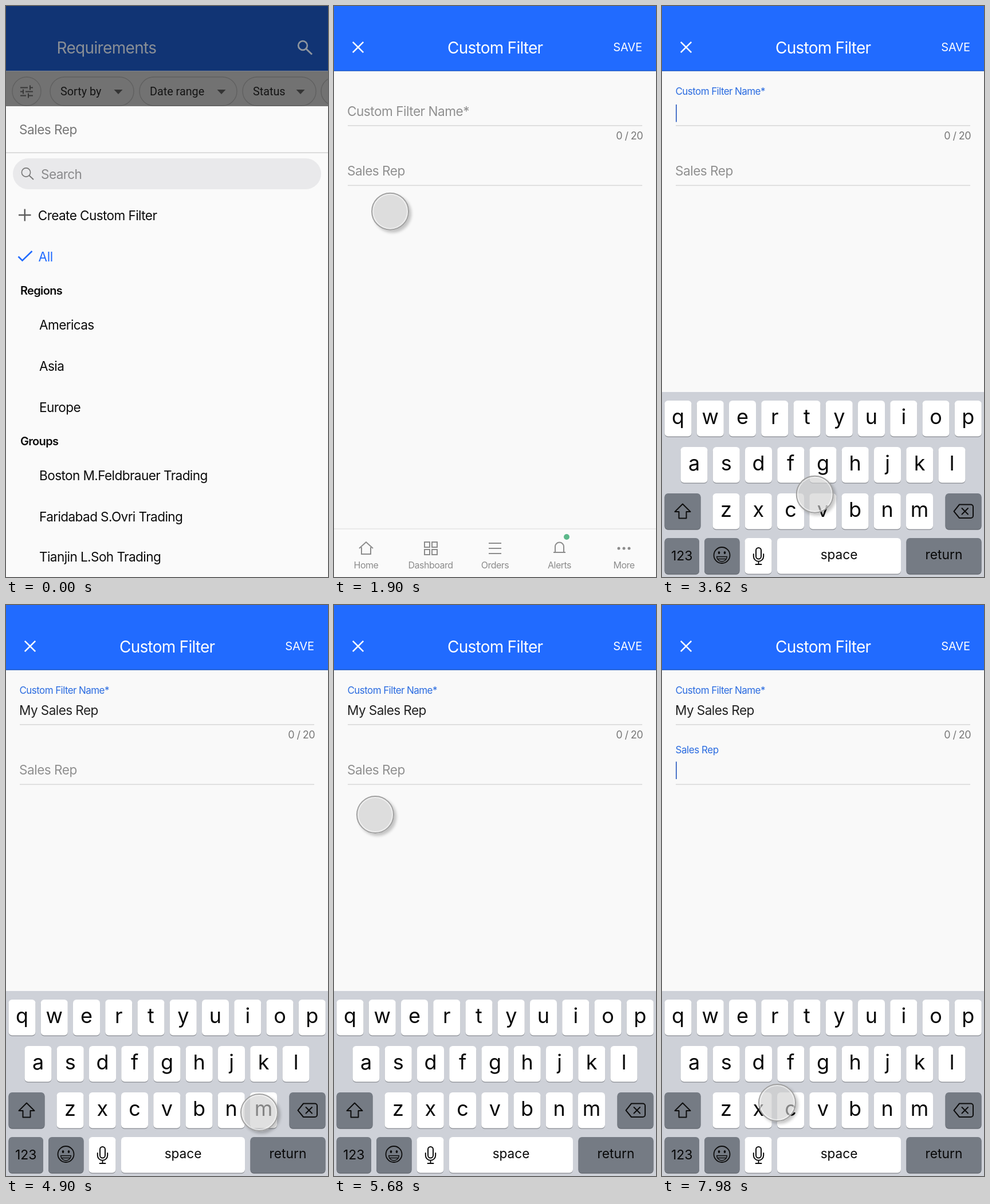
An HTML page that plays this animation: 562 px wide and 997 px high, repeating every 8000 ms.

```html
<!DOCTYPE html>
<html lang="en">
<head>
<meta charset="utf-8">
<title>Custom filter</title>
<style>
  html, body { margin: 0; width: 100%; height: 100%; overflow: hidden; background: #fafafa; }
  #stage { position: absolute; left: 0; top: 0; width: 562px; height: 997px; overflow: hidden; }
  svg { position: absolute; left: 0; top: 0; }
  text { font-family: Inter, "Open Sans", sans-serif; white-space: pre; }
  .chip { font-family: Roboto, sans-serif; }
  #touch {
    position: absolute; left: -33px; top: -33px; width: 66px; height: 66px;
    box-sizing: border-box; border-radius: 50%;
    border: 2px solid #a0a0a0; background: rgba(206, 206, 206, .63) padding-box;
    box-shadow: inset 0 0 0 2px rgba(255, 255, 255, .5), 4px 4px 5px rgba(0, 0, 0, .22);
  }
</style>
</head>
<body>
<div id="stage">
  <svg id="art" width="562" height="997" viewBox="0 0 562 997"></svg>
  <div id="touch"></div>
</div>
<script>
const NS = 'http://www.w3.org/2000/svg';
const art = document.getElementById('art');
const touch = document.getElementById('touch');
const BLUE = '#216bff', LINK = '#2a6be0', INK = '#0b0b0b';

function add(parent, tag, attrs, content) {
  const el = document.createElementNS(NS, tag);
  for (const name in attrs) el.setAttribute(name, attrs[name]);
  if (content) el.textContent = content;
  parent.appendChild(el);
  return el;
}
const group = parent => add(parent, 'g', {});
const rect = (p, x, y, w, h, fill, rx = 0) =>
  add(p, 'rect', { x, y, width: w, height: h, fill, rx });
const line = (p, d, stroke, width, more) =>
  add(p, 'path', { d, stroke, 'stroke-width': width, fill: 'none', ...more });
const ring = (p, cx, cy, r, stroke, width) =>
  add(p, 'circle', { cx, cy, r, stroke, 'stroke-width': width, fill: 'none' });
const text = (p, x, y, str, size = 22.6, fill = INK, gap = -.6, more) =>
  add(p, 'text', { x, y, fill, 'font-size': size, 'letter-spacing': gap, ...more }, str);

// Filter sheet over the dimmed list
function buildSheet(p) {
  rect(p, 0, 0, 562, 113.5, '#113474');
  text(p, 88.5, 82.5, 'Requirements', 28, '#8a8f96', -.67);
  ring(p, 518, 69, 7.8, '#8f969f', 2.7);
  line(p, 'M523.5 74.5L534 84.5', '#8f969f', 3);
  rect(p, 0, 113.5, 562, 61.5, '#727272');
  ring(p, 36, 149, 25, '#606060', 1.4);
  line(p, 'M25 142.5H38M42 142.5H47M25 149.5H30M34 149.5H47M25 156.5H35M39 156.5H47' +
    'M42 138.5V146.5M30 145.5V153.5M39 152.5V160.5', '#383838', 2);
  [[77, 146, 95, 'Sorty by', 196], [233, 170, 251, 'Date range', 376],
   [413, 128, 431, 'Status', 514], [550, 140]].forEach(([x, w, tx, label, ax]) => {
    add(p, 'rect', { x, y: 124, width: w, height: 50, rx: 25, fill: 'none', stroke: '#606060', 'stroke-width': 1.4 });
    if (!label) return;
    text(p, tx, 156, label, 19.8, '#141414', 0, { class: 'chip' });
    add(p, 'path', { d: `M${ax - 7.5} 146h15l-7.5 8z`, fill: '#343434' });
  });

  rect(p, 0, 175, 562, 822, '#fafafa');
  text(p, 23, 224, 'Sales Rep', 22.6, '#777', -.5);
  rect(p, 0, 255.5, 562, 1.4, '#d0d0d0');
  rect(p, 12, 266, 538, 54, '#e9e9eb', 27);
  ring(p, 35, 290.5, 7.6, '#777', 1.6);
  line(p, 'M40.5 296L48 303', '#777', 1.8);
  text(p, 61, 302, 'Search', 22.6, '#8a8a8c');
  line(p, 'M22 365H43.5M32.8 354.5V375.5', '#5c5c5c', 2.4);
  text(p, 55.8, 373.5, 'Create Custom Filter');
  line(p, 'M21.5 437.5L28.5 444.5L45.5 428', BLUE, 2.6);
  text(p, 56.5, 445.5, 'All', 22.6, BLUE, -.4);
  text(p, 25, 504, 'Regions', 20, INK, -.68, { 'font-weight': 600 });
  text(p, 25, 767, 'Groups', 20, INK, -.68, { 'font-weight': 600 });
  [['Americas', 565], ['Asia', 637], ['Europe', 708.5],
   ['Boston M.Feldbrauer Trading', 828], ['Faridabad S.Ovri Trading', 900],
   ['Tianjin L.Soh Trading', 970]].forEach(([name, y]) => text(p, 58, y, name));
}

// One form field; returns its parts so they can fade
function buildField(p, y, label, labelGap, caretY) {
  rect(p, 24, y + 16.5, 514, 1.6, '#d9d9d9');
  return {
    hint: text(p, 23, y, label, 22.6, '#909090', -.5),
    label: text(p, 23.5, y - 37, label, 17, LINK, labelGap),
    caret: rect(p, 24, caretY, 1.8, 30.5, '#3b68c4')
  };
}

function buildForm(p) {
  rect(p, 0, 0, 562, 997, '#f9f9f9');
  rect(p, 0, 0, 562, 113, BLUE);
  rect(p, 0, 112.5, 562, 1.3, '#1c55bd');
  line(p, 'M32.8 62.8L51.2 81.2M51.2 62.8L32.8 81.2', '#fff', 2.6);
  text(p, 198, 82.5, 'Custom Filter', 28, '#fff', -.75);
  text(p, 487.3, 79, 'SAVE', 20, '#fff', -.1);
  text(p, 492.3, 233, '0 / 20', 18, '#777', -.6);
}

function buildTabs(p) {
  const c = '#8c8c8c';
  rect(p, 0, 913, 562, 84, '#fafafa');
  rect(p, 0, 912.5, 562, 1, '#dcdcdc');
  ['Home', 'Dashboard', 'Orders', 'Alerts', 'More'].forEach((name, i) =>
    text(p, 56 + i * 112.5, 982, name, 16, c, -.5, { 'text-anchor': 'middle' }));
  line(p, 'M44 947L56 936L68 947M48 945V957H64V945', c, 2);
  line(p, 'M158 936h9v9h-9zM171 936h9v9h-9zM158 949h9v9h-9zM171 949h9v9h-9z', c, 2);
  line(p, 'M270 938H292M270 947H292M270 956H292', c, 2);
  line(p, 'M383 954H404M386 954V944a7.5 7.5 0 0 1 15 0V954', c, 2);
  add(p, 'circle', { cx: 406, cy: 927, r: 5, fill: '#5cb88a' });
  [497, 506, 515].forEach(cx => add(p, 'circle', { cx, cy: 947, r: 2.5, fill: c }));
}

function buildKeys(p) {
  const key = (x, y, w, label, size, base, dark) => {
    rect(p, x, y + 1.3, w, 62.5, dark ? '#62676e' : '#888b91', 6);
    rect(p, x, y, w, 62.5, dark ? '#757b84' : '#fff', 6);
    if (label) text(p, x + w / 2, base, label, size, '#080808', 0, { 'text-anchor': 'middle' });
  };
  rect(p, 0, 674, 562, 323, '#ced1d8');
  [['qwertyuiop', 4.5, 689, 730], ['asdfghjkl', 32.5, 770, 811], ['zxcvbnm', 88.5, 851, 892]]
    .forEach(([row, x, y, base]) => [...row].forEach((ch, i) => key(x + i * 56.25, y, 47, ch, 36, base)));
  key(4.5, 851, 63, '', 0, 0, true);
  key(494.5, 851, 63, '', 0, 0, true);
  key(4.5, 929, 60.5, '123', 23, 967.5, true);
  key(74, 929, 61.5, '', 0, 0, true);
  key(144.5, 929, 47, '');
  key(201, 929, 216, 'space', 22.6, 966);
  key(426.5, 929, 131, 'return', 22.8, 966, true);

  const k = '#0c0c0c', round = { 'stroke-linejoin': 'round', 'stroke-linecap': 'round' };
  line(p, 'M36 869.5L49.5 883H42.5V894.5H29.5V883H22.5Z', k, 2, round);
  line(p, 'M519 870.5H539a4 4 0 0 1 4 4V890a4 4 0 0 1-4 4H519L509.5 882.3ZM523.5 877L534 887.5M534 877L523.5 887.5', k, 2, round);
  ring(p, 104.5, 959, 14, k, 1.8);
  [99.5, 109.5].forEach(cx => add(p, 'ellipse', { cx, cy: 954.5, rx: 1.8, ry: 2.6, fill: k }));
  line(p, 'M95.5 961.5H113.5C113 967 109 970 104.5 970S96 967 95.5 961.5ZM96.5 965.5H112.5', k, 1.4, round);
  add(p, 'rect', { x: 164, y: 946, width: 9, height: 19.5, rx: 4.5, fill: 'none', stroke: k, 'stroke-width': 2 });
  line(p, 'M159.8 957V961a8.7 8.7 0 0 0 17.4 0V957M168.5 970V975M163.5 975H173.5', k, 2, round);
}

buildSheet(group(art));
const form = group(art);
buildForm(form);
const nameField = buildField(form, 191.5, 'Custom Filter Name*', -.58, 172);
const typed = text(form, 23, 191.5, 'My Sales Rep', 22.6, '#222');
const repField = buildField(form, 296, 'Sales Rep', -.45, 273.5);
buildTabs(form);
const keys = group(form);
buildKeys(keys);

// Fades advance one even step at each listed time
const FADES = {
  form: [1200, 1260],
  keys: [2320, 2380, 2440, 2500],
  typed: [4100, 4180, 4260],
  rep: [6000, 6060, 6120, 6160]
};
const fade = (name, t) => FADES[name].filter(s => t >= s).length / FADES[name].length;

const glide = (k = .15) => u => k * u + (1 - k) * u * u * (3 - 2 * u);
const slow = u => u * (2 - u);

// Touch moves: start, end, easing, then the points of a line or cubic curve
const MOVES = [
  [360, 1000, glide(), [404, -50], [400, 250], [220, 420], [101, 375]],
  [1860, 2100, glide(), [101, 375], [68, 189]],
  [3280, 4000, glide(), [68, 189], [60, 850], [550, 1150], [442, 886]],
  [4900, 5680, glide(.4), [442, 886], [290, 1095], [85, 560], [72, 366]],
  [5680, 5940, slow, [72, 366], [79, 303]],
  [6680, 7240, glide(), [79, 303], [80, 560], [200, 850], [217, 876]],
  [7940, 7980, u => u, [217, 876], [201, 869]]
];

// Point on a curve by repeated interpolation
function onCurve(pts, u) {
  while (pts.length > 1)
    pts = pts.slice(1).map((b, i) => [0, 1].map(n => pts[i][n] + (b[n] - pts[i][n]) * u));
  return pts[0];
}

function place(t) {
  const [from, to, ease, ...pts] = MOVES.filter(m => t >= m[0]).pop() || MOVES[0];
  const u = Math.min(1, Math.max(0, (t - from) / (to - from)));
  return onCurve(pts, ease(u));
}

const show = (el, v) => el.setAttribute('opacity', v);

function draw(t) {
  const focus = fade('keys', t), done = fade('typed', t), rep = fade('rep', t);
  show(form, fade('form', t));
  show(keys, focus);
  show(nameField.hint, 1 - focus);
  show(nameField.label, focus);
  show(nameField.caret, focus * (1 - done));
  show(typed, done);
  show(repField.hint, 1 - rep);
  show(repField.label, rep);
  show(repField.caret, rep);

  const [x, y] = place(t);
  const tap = t > 1060 && t < 1160 ? Math.sin((t - 1060) / 100 * Math.PI) : 0;
  touch.style.transform = `translate(${x}px, ${y}px) scale(${1 - .05 * tap})`;
}

const LOOP = 8000, TICK = 20, start = performance.now();
function frame() {
  const t = (performance.now() - start) % LOOP;
  draw(t - t % TICK);
  requestAnimationFrame(frame);
}
draw(0);
requestAnimationFrame(frame);
</script>
</body>
</html>
```
